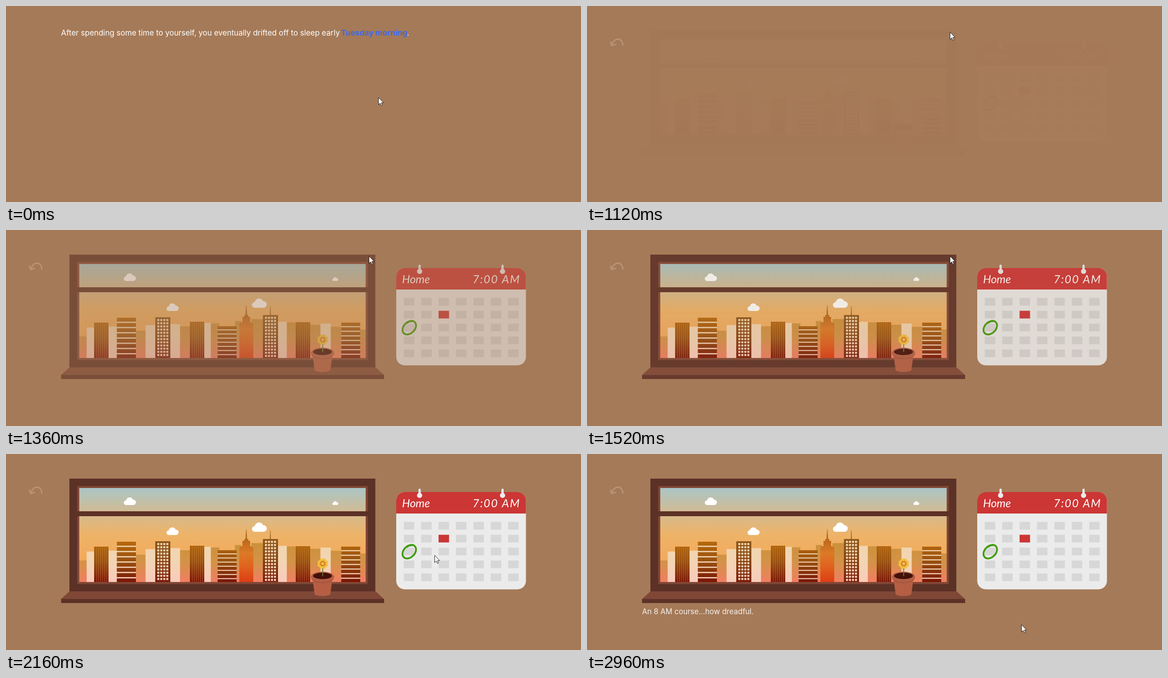
An HTML page with a canvas that plays this animation: 1279 px wide and 438 px high, repeating every 3.04 s.

```html
<!DOCTYPE html>
<html lang="en">
<head>
<meta charset="utf-8">
<title>Morning window</title>
<style>
html, body { margin: 0; width: 100%; height: 100%; overflow: hidden; background: #a57a58; }
canvas { display: block; width: 1279px; height: 438px; }
</style>
</head>
<body>
<canvas id="stage" width="1279" height="438"></canvas>
<script>
const W = 1279, H = 438, LOOP = 3040, STEP = 80;
const CLICK = 720, ROOM_IN = 1100, LINE_IN = 2500, FADE = 750;
const BG = '#a57a58', WOOD = '#5c3126', TRIM = '#824836', RED = '#cc3635', PAPER = '#ebebeb';
const stage = document.getElementById('stage').getContext('2d');
const room = document.createElement('canvas');
room.width = W;
room.height = H;
let c = room.getContext('2d');

// helpers, boxes are given by their edges
function box(x1, y1, x2, y2, fill) {
  c.fillStyle = fill;
  c.fillRect(x1, y1, x2 - x1, y2 - y1);
}
// symmetric upright shape, half as wide as w1 above and w2 below the middle
function taper(x, y1, y2, w1, w2, fill) {
  c.beginPath();
  c.moveTo(x - w1, y1);
  c.lineTo(x + w1, y1);
  c.lineTo(x + w2, y2);
  c.lineTo(x - w2, y2);
  c.fillStyle = fill;
  c.fill();
}
function oval(x, y, rx, ry, fill) {
  c.beginPath();
  c.ellipse(x, y, rx, ry, 0, 0, Math.PI * 2);
  c.fillStyle = fill;
  c.fill();
}
function ring(count, r, visit) {
  for (let i = 0; i < count; i++) {
    const a = (i + 0.5) * 2 * Math.PI / count;
    visit(r * Math.cos(a), r * Math.sin(a));
  }
}
function fade(y1, y2, ...colors) {
  const g = c.createLinearGradient(0, y1, 0, y2);
  colors.forEach((color, i) => g.addColorStop(i / (colors.length - 1), color));
  return g;
}
function text(str, x, y, font, fill, spacing = 0) {
  c.font = font;
  c.letterSpacing = spacing + 'px';
  c.fillStyle = fill;
  c.fillText(str, x, y);
}

// city
const LEFT = 163, RIGHT = 800, GROUND = 286, MIDDLE = 560;
const cream = fade(200, GROUND, '#f0d6ae', '#f3d4b4', '#f9cbbb');
const ochre = fade(194, GROUND, '#cb9139', '#d39347', '#f07e62');
const rust = fade(195, GROUND, '#b8690b', '#985010', '#781505');
const umber = fade(190, GROUND, '#90591a', '#85400f', '#7a1a08');
const orange = fade(190, GROUND, '#b8681a', '#dc7a26', '#e0601d', '#dc3d14');

const floors = { w: 42.5, draw(x, top) {
  const pitch = (GROUND - top) * 0.13;
  box(x, top, x + this.w, GROUND, cream);
  for (let y = top; y < GROUND; y += pitch) box(x, y, x + this.w, Math.min(y + pitch * 0.76, GROUND), rust);
} };
const columns = { w: 32, draw(x, top) {
  box(x, top, x + this.w, GROUND, rust);
  c.globalAlpha = 0.45;
  for (let i = 1; i < 7; i++) box(x + i * 4.6, top + 1, x + i * 4.6 + 1.3, GROUND, ochre);
  c.globalAlpha = 1;
} };
const panes = { w: 33.5, draw(x, top) {
  box(x, top, x + this.w, GROUND, umber);
  for (let y = top + 4; y < GROUND - 2; y += 7.1)
    for (let i = 0; i < 4; i++) box(x + 4.5 + i * 6.7, y, x + 9 + i * 6.7, y + 4.5, cream);
} };
const tower = { w: 31, draw(x, top) {
  const mid = x + this.w / 2;
  taper(mid, top - 22, top + 1, 0.4, 2, '#b06a22');
  box(mid - 4.5, top, mid + 4.5, top + 5, orange);
  box(mid - 8.5, top + 4, mid + 8.5, top + 17, orange);
  taper(mid, top + 16, top + 19, 10.5, this.w / 2, orange);
  box(x, top + 19, x + this.w, GROUND, orange);
} };
const FRONT = [
  [columns, 196, 207], [floors, 246.5, 196], [panes, 332, 195], [columns, 409, 205], [floors, 470.5, 215],
  [tower, 519, 190], [panes, 571.5, 190], [columns, 644.5, 206], [floors, 745.5, 207]
];
// blocks seen in each gap between the front buildings: o = ochre, c = cream
const BACK = 'oc c oc co co o o co oco o'.split(' ');

function backRow(kinds, from, to) {
  const w = (to - from) / kinds.length;
  [...kinds].forEach((kind, i) => {
    const x = from + i * w, off = Math.abs(x + w / 2 - MIDDLE);
    const first = i === 0, last = i === kinds.length - 1;
    const x1 = Math.max(LEFT, first ? x - 4 : x), x2 = Math.min(RIGHT, last ? x + w + 4 : x + w);
    if (kind === 'o') box(x1, 199 + off * 0.1, x2, GROUND, ochre);
    else box(x1, 203 + off * 0.04, x2, GROUND, cream);
  });
}
function cloud(x, y, w) {
  c.save();
  c.translate(x, y);
  c.scale(w / 27, w / 27);
  oval(5.5, 11.8, 5.5, 5.2, '#fff');
  oval(13, 8, 8, 8, '#fff');
  oval(20.8, 11, 6.2, 6, '#fff');
  box(5.5, 9, 20.8, 17, '#fff');
  c.restore();
}
function city() {
  box(LEFT, 76, RIGHT, GROUND, fade(76, GROUND, '#aac6c6', '#d2bb93', '#eeb367', '#f2aa5d', '#ee8a62'));
  cloud(262, 97, 27);
  cloud(357, 164, 27);
  cloud(547, 153, 33);
  cloud(726, 105.5, 13);
  let edge = LEFT;
  BACK.forEach((kinds, i) => {
    const next = FRONT[i];
    backRow(kinds, edge, next ? next[1] : RIGHT);
    if (next) edge = next[1] + next[0].w;
  });
  taper(588, 170, 191, 0.4, 1.2, '#9a6325');
  for (const [kind, x, top] of FRONT) kind.draw(x, top);
}

function plant() {
  const x = 704, fy = 245;
  taper(x, 280, 313, 22, 17.5, '#b55e44');
  oval(x, 312.5, 17.5, 5, '#b55e44');
  oval(x, 277, 25, 11.5, '#a35039');
  oval(x, 274.8, 26, 11.8, '#b15f47');
  oval(x, 272.3, 21, 7.3, '#43100a');
  box(x - 0.6, 254, x + 1.4, 273, '#6e7a2b');
  c.save();
  c.translate(x + 0.5, fy);
  ring(8, 8, (px, py) => oval(px, py, 4.2, 4.2, '#f1c13d'));
  oval(0, 0, 8, 8, '#f1c13d');
  ring(8, 6, (px, py) => oval(px, py, 1.2, 1.2, '#d87723'));
  oval(0, 0, 5.2, 5.2, '#d87723');
  oval(0, 0, 3, 3, '#f4c75a');
  c.restore();
}
function windowFrame() {
  box(141, 55, 821.5, 307, WOOD);
  box(158.5, 71.5, 804.5, 290.5, TRIM);
  city();
  box(158, 128, 805, 139, WOOD);
  taper(481.7, 307, 324, 340.5, 359.2, '#7f4736');
  box(122.5, 324, 841, 333, WOOD);
  plant();
}

function calendar() {
  c.save();
  c.beginPath();
  c.roundRect(868, 85, 288.5, 217.5, 19);
  c.clip();
  box(868, 85, 1157, 303, PAPER);
  box(868, 85, 1157, 133, RED);
  c.restore();
  for (const x of [920, 1104.5]) {
    c.beginPath();
    c.roundRect(x - 2.5, 77.5, 5, 15, 2);
    c.fillStyle = PAPER;
    c.fill();
    oval(x, 92.5, 5.8, 5.8, PAPER);
  }
  const hand = 'italic 25px Lato, sans-serif';
  text('Home', 881, 119, hand, '#fff');
  text('7:00 AM', 1038, 119, hand, '#fff', 1.9);
  for (let row = 0; row < 5; row++)
    for (let col = 0; col < 7; col++) {
      const x = 884.8 + col * 38.7, y = 151.7 + row * 28.8;
      box(x, y, x + 23.3, y + 17.2, row === 1 && col === 2 ? RED : '#d7d7d7');
    }
  c.strokeStyle = '#419d0e';
  c.lineWidth = 4;
  c.lineCap = 'round';
  c.beginPath();
  c.ellipse(897, 218.3, 17.4, 12.4, -0.8, 0, Math.PI * 2);
  c.moveTo(892, 207.5);
  c.quadraticCurveTo(897, 203.5, 903, 203.8);
  c.stroke();
}

const UNDO = new Path2D('M80 88.5C79.5 70 60 69 55.6 87M52 79.5L55 88.3 64.5 85.5');
function undoArrow() {
  c.strokeStyle = 'rgba(255,255,255,.2)';
  c.lineWidth = 3;
  c.stroke(UNDO);
}

const ARROW = new Path2D('M.5 .5V16.6L4.2 13.2 6.7 18.7 9.2 17.6 6.8 12.2H11.7Z');
const HAND = new Path2D('M-1.5 1.5Q0-.8 1.5 1.5V6.6Q3.4 5.6 4.2 7.2 6 6.4 6.8 8.2 9 7.6 9 9.6V13.5L7.2 17V19H-1V17.2L-5.8 11.5Q-6 8.8-3.8 9.6L-1.5 11.6Z');
const KNUCKLES = new Path2D('M1.5 6.5V10M4.2 7.2V10.2M6.8 8.2V10.6');

// start, end, then where the pointer arrives
const MOVES = [[0, 600, 815, 62], [CLICK, 1080, 807, 58], [1640, 2160, 953, 226], [2200, 2800, 966, 381]];
function pointer(t) {
  let x = 828, y = 204;
  for (const [from, to, toX, toY] of MOVES) {
    const u = Math.min(1, Math.max(0, (t - from) / (to - from)));
    const s = u * u * (3 - 2 * u);
    x += (toX - x) * s;
    y += (toY - y) * s;
  }
  return [Math.round(x), Math.round(y)];
}
function cursor(t) {
  const [x, y] = pointer(t);
  const onLink = t < CLICK && y < 71;
  c.save();
  c.translate(x, y);
  c.lineWidth = 1;
  c.lineJoin = 'round';
  c.fillStyle = '#fff';
  c.strokeStyle = '#1c1512';
  c.fill(onLink ? HAND : ARROW);
  c.stroke(onLink ? HAND : ARROW);
  if (onLink) c.stroke(KNUCKLES);
  c.restore();
}

// cubic-bezier(.25, .1, .25, 1)
function ease(p) {
  if (p <= 0) return 0;
  if (p >= 1) return 1;
  const curve = (a, b, s) => 3 * a * s * (1 - s) ** 2 + 3 * b * s * s * (1 - s) + s ** 3;
  let lo = 0, hi = 1;
  for (let i = 0; i < 24; i++) {
    const mid = (lo + hi) / 2;
    if (curve(0.25, 0.25, mid) < p) lo = mid; else hi = mid;
  }
  return curve(0.1, 1, lo);
}
const shown = (t, start) => ease((t - start) / FADE);

function draw(t) {
  box(0, 0, W, H, BG);
  if (t < CLICK) {
    const plain = '17.05px Inter, sans-serif';
    text('After spending some time to yourself, you eventually drifted off to sleep early', 122.5, 65.5, plain, '#fff');
    text('Tuesday morning', 745, 65.5, 'bold 17.4px Inter, sans-serif', '#4169e1');
    text('.', 892, 65.5, plain, '#fff');
  } else {
    c.globalAlpha = shown(t, CLICK - STEP * 2);
    undoArrow();
    c.globalAlpha = shown(t, ROOM_IN);
    c.drawImage(room, 0, 0);
    c.globalAlpha = shown(t, LINE_IN);
    text('An 8 AM course...how dreadful.', 122.5, 357.5, '16.6px Inter, sans-serif', '#fff');
    c.globalAlpha = 1;
  }
  cursor(t);
}

windowFrame();
calendar();
c = stage;

const start = performance.now();
function tick() {
  const t = (performance.now() - start) % LOOP;
  draw(Math.floor(t / STEP) * STEP);
  requestAnimationFrame(tick);
}
draw(0);
requestAnimationFrame(tick);
</script>
</body>
</html>
```
